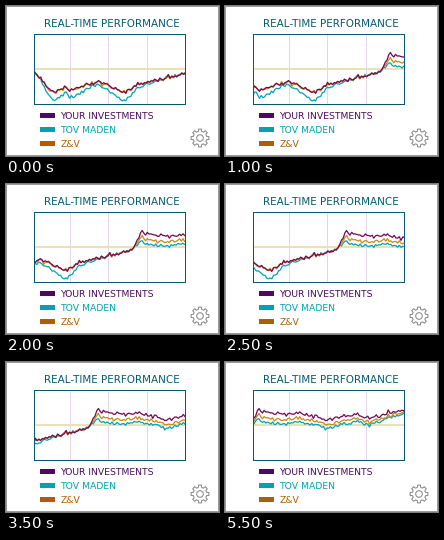
A matplotlib script for the animation above (6 s loop, 213 by 150 pixels).

```python
import numpy as np
import matplotlib.pyplot as plt
from matplotlib.animation import FuncAnimation
from matplotlib.patches import Circle, Polygon, Rectangle

W, H, DPI = 213, 150, 64
PT = 72 / DPI
FRAMES, INTERVAL = 12, 500
STEP = 14.6  # pixels scrolled per frame
LEFT, TOP, RIGHT, BOTTOM = 28, 28, 179, 98

INK, PURPLE, TEAL, ORANGE = "#075a6e", "#4b0a5c", "#00a3ad", "#ad5f00"
LINE_COLORS = ("#00a3b4", "#c98a14", "#75074f")

# Turning points of the leading line: scroll position and height
TURNS = [(0, 67), (19, 86), (32, 81), (36, 85), (62, 76), (80, 82), (88, 87),
         (104, 78), (157, 66), (166, 47), (170, 50), (194, 53), (203, 50),
         (238, 58), (263, 52), (277, 56), (312, 48)]


def make_series():
    """Lead line plus two followers that drop away after the jump."""
    rng = np.random.default_rng(8)
    u = np.arange(0, 313, 1.7)
    lead = np.interp(u, *zip(*TURNS))
    gap = np.clip((u - 158) / 8, 0, 1) * (1 - 0.65 * ((u - 165) / 147) ** 2)
    sag = 0.6 * np.clip(lead - 72, 0, None)
    shared = rng.normal(0, 0.85, u.size)

    def jitter(y):
        noisy = y + shared + rng.normal(0, 0.6, u.size)
        return np.clip(noisy, 46.5, 95.5)

    return u, [jitter(lead + 10 * gap + sag), jitter(lead + 5.5 * gap),
               jitter(lead)]


def label(x, y, text, size, color, **kw):
    ax.text(x, y, text, fontsize=size * PT, color=color, va="baseline",
            family="DejaVu Sans", **kw)


def block(x, y, w, h, color, z=1):
    ax.add_patch(Rectangle((x, y), w, h, fc=color, lw=0, antialiased=False,
                           zorder=z))


def outline(x0, y0, x1, y1, color):
    for y in (y0, y1):
        block(x0, y, x1 - x0 + 1, 1, color, 4)
    for x in (x0, x1):
        block(x, y0, 1, y1 - y0 + 1, color, 4)


def gear(cx, cy, teeth=8, inner=6.8, outer=9):
    pitch = 2 * np.pi / teeth
    points = []
    for k in range(teeth):
        for offset, r in ((-0.32, inner), (-0.2, outer),
                          (0.2, outer), (0.32, inner)):
            a = (k + offset) * pitch
            points.append((cx + r * np.cos(a), cy + r * np.sin(a)))
    style = dict(fill=False, ec="#858585", lw=PT)
    ax.add_patch(Polygon(points, joinstyle="round", **style))
    ax.add_patch(Circle((cx, cy), 3.3, **style))


fig = plt.figure(figsize=(W / DPI, H / DPI), dpi=DPI, facecolor="white")
ax = fig.add_axes([0, 0, 1, 1])
ax.set(xlim=(0, W), ylim=(H, 0))
ax.axis("off")

outline(0, 0, W - 1, H - 1, "#9a9a9a")
label(105.5, 21, "REAL-TIME PERFORMANCE", 10.4, INK, ha="center")

for x in (64, 102, 141):
    block(x, TOP + 1, 1, BOTTOM - TOP - 1, "#e2d6e8")
block(LEFT + 1, 62, RIGHT - LEFT - 1, 2, "#ece0b4")
outline(LEFT, TOP, RIGHT, BOTTOM, INK)

legend = ((PURPLE, "YOUR INVESTMENTS"), (TEAL, "TOV MADEN"), (ORANGE, "Z&V"))
for row, (color, text) in enumerate(legend):
    y = 107 + 14 * row
    block(34, y, 15, 5, color)
    label(54.5, y + 6, text, 9.25, color)
gear(194, 132)

u, series = make_series()
window = Rectangle((LEFT + 1, TOP + 1), RIGHT - LEFT - 1, BOTTOM - TOP - 1,
                   transform=ax.transData)
lines = []
for y, color in zip(series, LINE_COLORS):
    line, = ax.plot(u + LEFT, y, color=color, lw=1.25 * PT,
                    solid_joinstyle="round", zorder=3)
    line.set_clip_path(window)
    lines.append(line)


def draw(frame):
    for line in lines:
        line.set_xdata(u + LEFT - STEP * frame)
    return lines


anim = FuncAnimation(fig, draw, frames=FRAMES, interval=INTERVAL,
                     repeat=True, repeat_delay=0)
plt.show()
```
